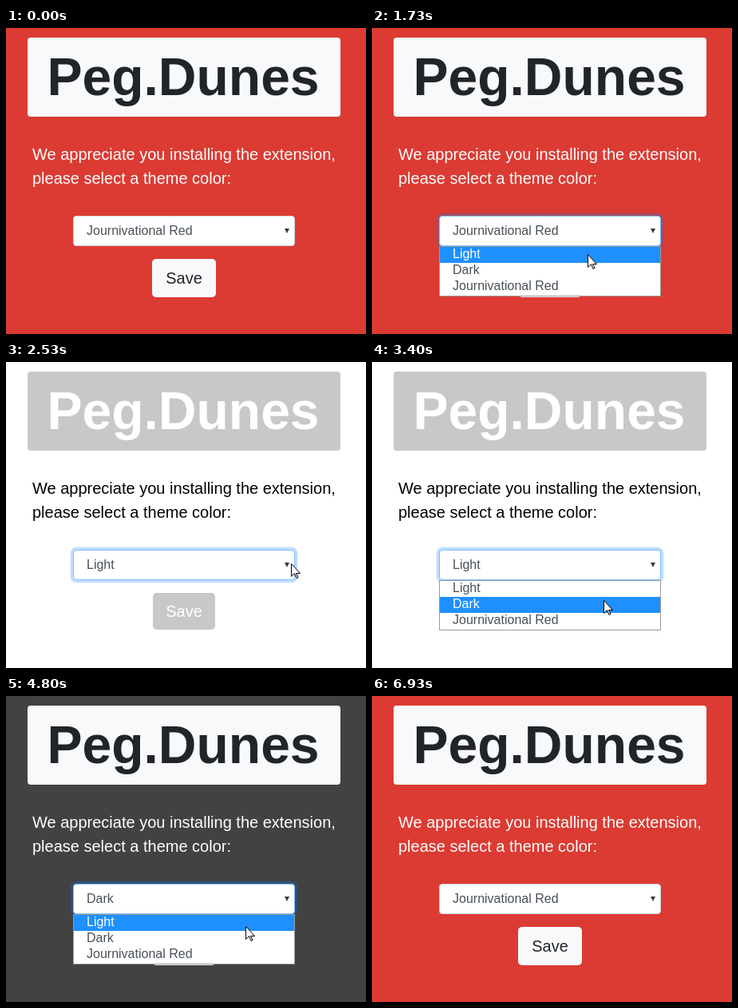
These frames come from a looping animation (451 by 383 pixels, 6.99 s). An HTML page:

```html
<!DOCTYPE html>
<html lang="en">
<head>
<meta charset="utf-8">
<title>Theme picker</title>
<style>
  html, body { margin: 0; width: 100%; height: 100%; overflow: hidden; }
  svg { display: block; width: 451px; height: 383px; background: var(--page); }
  text { font-family: "Liberation Sans", Arial, sans-serif; font-size: 16px; fill: #495057; }
  .panel { fill: var(--panel); }
  .title { font-size: 66px; font-weight: bold; fill: var(--ink); text-anchor: middle; }
  .intro { font-size: 20px; fill: var(--text); }
  .save { font-size: 20px; fill: var(--ink); text-anchor: middle; }
</style>
</head>
<body>
<svg id="stage" viewBox="0 0 451 383">
  <rect class="panel" x="27" y="12" width="392" height="99" rx="4"/>
  <text class="title" x="222" y="84">Peg.Dunes</text>
  <text class="intro" x="33" y="165">We appreciate you installing the extension,</text>
  <text class="intro" x="33" y="195">please select a theme color:</text>

  <rect id="button" class="panel" y="289" rx="4.8"/>
  <text id="save" class="save" x="223">Save</text>

  <rect id="glow" x="80.8" y="231.8" width="284.4" height="44.4" rx="7.2" fill="#007bff" fill-opacity=".25"/>
  <rect id="field" x="84.5" y="235.5" width="277" height="37" rx="3.5" fill="#fff"/>
  <text id="value" x="101" y="259"></text>
  <path d="M349 251h6l-3 6z" fill="#343a40"/>

  <g id="popup">
    <rect x="84.5" y="273.5" width="277" height="62" fill="#fff" stroke="#999"/>
    <rect id="highlight" x="85" width="276" height="20" fill="#1e90ff"/>
  </g>
  <path id="cursor" d="M.5 .5V16.5L4.5 12.5 7 18.5 9 17.5 6.5 12.5H11.5Z" fill="#fff" stroke="#000"/>
</svg>
<script>
const LOOP = 6990, FPS = 15, ROW = 20, LIST_TOP = 274;
const el = id => document.getElementById(id);

const dim = { panel: '#f8f9fa', ink: '#212529', text: '#fff' };
const light = { name: 'Light', page: '#fff', panel: '#c8c8c8', ink: '#fff', text: '#000' };
const dark = { name: 'Dark', page: '#424242', ...dim };
const red = { name: 'Journivational Red', page: '#db3b33', ...dim };
const themes = [light, dark, red];

// Times are in ticks, FPS per second. Each pick opens the list, chooses an item, then rests.
const OPEN_FOR = 12, ENTER = 4, LEAVE = 96;
const picks = [
  { open: 17, theme: light, arrow: [312, 251], item: [270, 283], rest: [365, 258] },
  { open: 42, theme: dark, arrow: [357, 252], item: [290, 298], rest: [405, 279] },
  { open: 70, theme: red, arrow: [336, 259], item: [284, 319] }
];
const entry = [437, 374], firstRow = [300, 288], exit = [248, 347];

const route = [];
const go = (from, to, point) => route.push({ from, to, point });
for (const { open, arrow, item, rest = item } of picks) {
  const chosen = open + OPEN_FOR;
  go(open - 12, open - 4, arrow);
  go(open, open + 2, firstRow);
  go(open + 2, open + 9, item);
  go(chosen, chosen + 2, rest);
}
go(LEAVE - 2, LEAVE - 1, exit);

function pointerAt(n) {
  let point = entry;
  for (const leg of route) {
    if (n <= leg.from) break;
    const k = Math.min(1, (n - leg.from) / (leg.to - leg.from));
    point = point.map((v, i) => v + (leg.point[i] - v) * k);
  }
  return point.map(Math.round);
}

function set(id, attrs) {
  for (const key in attrs) el(id).setAttribute(key, attrs[key]);
}
const visible = on => on ? 'visible' : 'hidden';

const options = themes.map((theme, i) => {
  const label = document.createElementNS('http://www.w3.org/2000/svg', 'text');
  label.setAttribute('x', 101);
  label.setAttribute('y', LIST_TOP + 14 + i * ROW);
  label.textContent = theme.name;
  el('popup').append(label);
  return label;
});

function draw(ms) {
  const n = Math.floor((ms % LOOP + 5) * FPS / 1000);
  const done = picks.filter(p => n >= p.open + OPEN_FOR);
  const theme = done.length ? done[done.length - 1].theme : red;
  for (const key of ['page', 'panel', 'ink', 'text'])
    el('stage').style.setProperty('--' + key, theme[key]);

  // The light button has no border, so it is 2px smaller
  const inset = theme === light ? 1 : 0;
  set('button', { x: 183 + inset, width: 80 - 2 * inset, height: 48 - 2 * inset });
  set('save', { y: 320 - inset });
  el('value').textContent = theme.name;

  const focused = n >= picks[0].open && n < LEAVE + 8;
  set('glow', { visibility: visible(focused) });
  set('field', { stroke: focused ? '#80bdff' : '#ced4da' });

  const [x, y] = pointerAt(n);
  set('cursor', {
    visibility: visible(n >= ENTER && n < LEAVE),
    transform: `translate(${x} ${y})`
  });

  const open = picks.some(p => n >= p.open && n < p.open + OPEN_FOR);
  el('popup').style.display = open ? '' : 'none';
  const active = y < LIST_TOP ? themes.indexOf(theme) : Math.min(2, Math.floor((y - LIST_TOP) / ROW));
  set('highlight', { y: LIST_TOP + active * ROW });
  options.forEach((label, i) => { label.style.fill = i === active ? '#fff' : ''; });
}

const start = performance.now();
function tick() {
  draw(performance.now() - start);
  requestAnimationFrame(tick);
}
tick();
</script>
</body>
</html>
```
